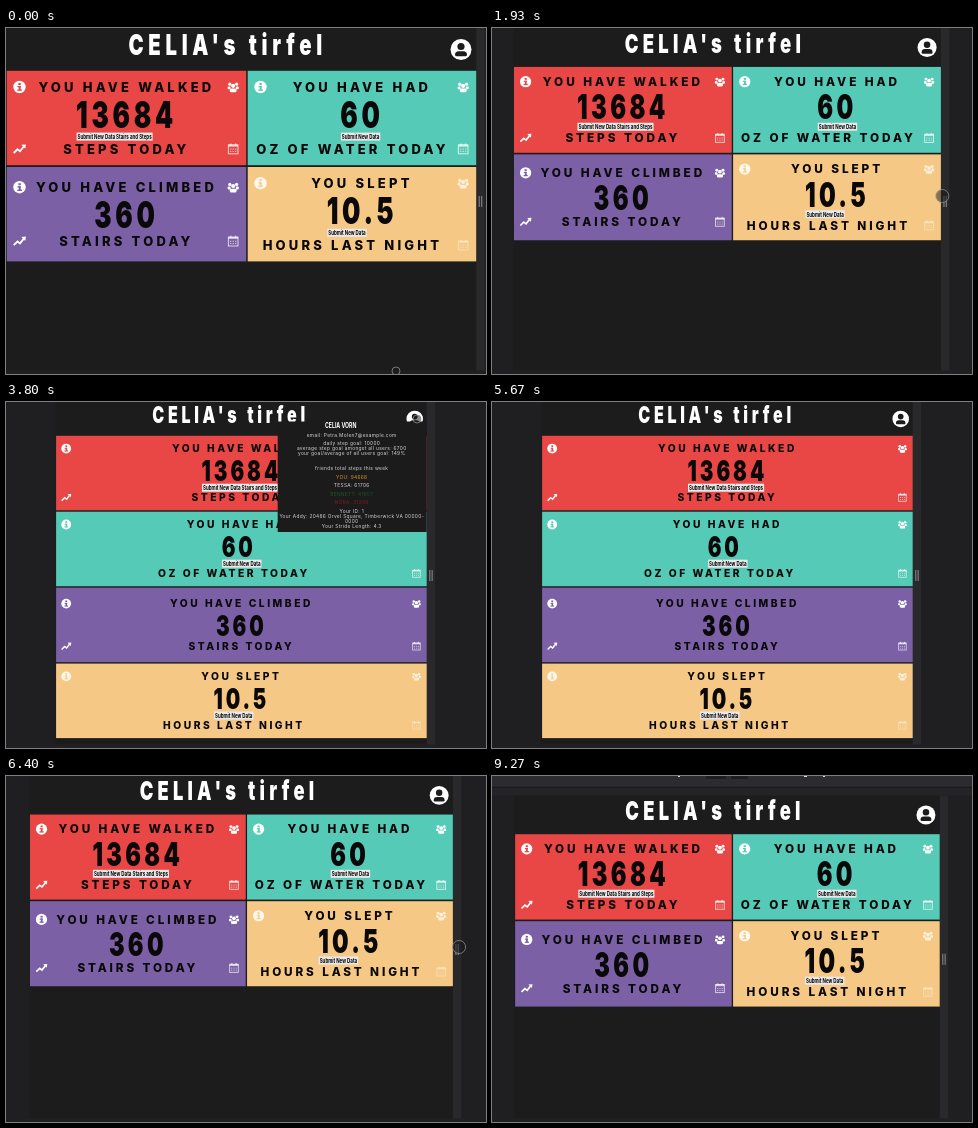
Recreate the animation shown at these times as an HTML page with a canvas. Size 480x346 px, loop 9590 ms.

```html
<!DOCTYPE html>
<html lang="en">
<head>
<meta charset="utf-8">
<title>Fitness dashboard</title>
<style>
  html, body { margin: 0; width: 480px; height: 346px; overflow: hidden; background: #1f1f22; }
  canvas { display: block; }
</style>
</head>
<body>
<canvas id="stage" width="480" height="346"></canvas>
<script>
const ctx = document.getElementById('stage').getContext('2d');
const LOOP = 9590;
const BASE = 470;          // page width at which the layout has scale 1
const BREAKPOINT = 400;    // below this the cards stack
const NARROW = 0.7;        // shared proportion of the condensed display face
const INK = '#0a0808';

const cards = [
  { color: '#e84745', head: 'YOU HAVE WALKED', value: '13684', foot: 'STEPS TODAY',
    button: 'Submit New Data Stairs and Steps', trend: true, slot: 0, row: 0 },
  { color: '#55cab6', head: 'YOU HAVE HAD', value: '60', foot: 'OZ OF WATER TODAY',
    button: 'Submit New Data', slot: 1, row: 0 },
  { color: '#7b60a6', head: 'YOU HAVE CLIMBED', value: '360', foot: 'STAIRS TODAY',
    trend: true, slot: 0, row: 1 },
  { color: '#f5c985', head: 'YOU SLEPT', value: '10.5', foot: 'HOURS LAST NIGHT',
    button: 'Submit New Data', faint: true, slot: 1, row: 1 }
];

const profile = [
  [33, 'email: Petra.Molen7@example.com'],
  [41, 'daily step goal: 10000'],
  [46, 'average step goal amongst all users: 6700'],
  [51, 'your goal/average of all users goal: 149%'],
  [66, 'friends total steps this week'],
  [75, 'YOU: 94668', '#e0922e'],
  [83.5, 'TESSA: 61706'],
  [92, 'BENNETT: 41657', '#23552b'],
  [100, 'NORA: 31208', '#7c2020'],
  [109, 'Your ID: 1'],
  [114, 'Your Addy: 20486 Orvel Square, Timberwick VA 00000-'],
  [119, '0000'],
  [124, 'Your Stride Length: 4.3']
];

const widthKeys = [[0, 470], [1600, 470], [2330, 371], [6070, 371], [6440, 425]];
const scrollKeys = [[0, 0], [9030, 0], [9270, 19.5]];
const cursorKeys = [
  [0, 390, 343], [70, 390, 343], [1000, 474, 172], [1130, 474, 172], [1270, 471, 168],
  [1600, 471, 168], [2330, 423, 168], [2870, 423, 168], [3500, 411, 17],
  [4930, 411, 17], [5600, 425, 174], [6070, 425, 171], [6440, 454, 171],
  [7070, 454, 171], [8000, 340, 118], [9000, 320, 3]
];

function track(keys, t, column = 1) {
  const next = keys.findIndex(key => key[0] > t);
  if (next < 0) return keys[keys.length - 1][column];
  const a = keys[next - 1], b = keys[next];
  const u = (t - a[0]) / (b[0] - a[0]);
  return a[column] + (b[column] - a[column]) * u * u * (3 - 2 * u);
}

function rect(x, y, w, h, color) {
  ctx.fillStyle = color;
  ctx.fillRect(x, y, w, h);
}

function disc(x, y, r) {
  ctx.beginPath();
  ctx.arc(x, y, r, 0, Math.PI * 2);
  ctx.fill();
}

function line(points, width) {
  ctx.lineWidth = width;
  ctx.beginPath();
  points.forEach(([x, y]) => ctx.lineTo(x, y));
  ctx.stroke();
}

// Type styles; a run's width includes the spacing after its last letter.
const styles = {
  title: { size: 29, weight: 900, spacing: 4.7, squeeze: NARROW },
  heading: { size: 13, weight: 800, spacing: 3.2 },
  value: { size: 37, weight: 900, spacing: 3.7, squeeze: NARROW },
  button: { size: 6.4, weight: 700, squeeze: NARROW },
  name: { size: 7.4, weight: 700, squeeze: NARROW },
  small: { size: 4.8, weight: 400, spacing: 0.33 }
};

function setStyle({ size, weight, spacing = 0, squeeze = 1 }) {
  ctx.font = `${weight} ${size}px Inter, sans-serif`;
  ctx.letterSpacing = `${spacing / squeeze}px`;
  return squeeze;
}

function textWidth(str, style) {
  const squeeze = setStyle(style);
  return ctx.measureText(str).width * squeeze;
}

function text(str, x, y, style, color = INK) {
  ctx.save();
  ctx.translate(x, y);
  ctx.scale(setStyle(style), 1);
  ctx.fillStyle = color;
  ctx.fillText(str, 0, 0);
  ctx.restore();
}

function centred(str, x, y, style, color) {
  text(str, x - textWidth(str, style) / 2, y, style, color);
}

// Icons are drawn around their own centre.
const icons = {
  info(color) {
    disc(0, 0, 6.2);
    rect(-1.1, -4, 2.4, 2, color);
    rect(-2, -1, 3.2, 1.3, color);
    rect(-0.8, -1, 2, 4, color);
    rect(-2.2, 2.4, 4.6, 1.4, color);
  },
  users() {
    disc(-3.4, -2.8, 1.6);
    disc(3.4, -2.8, 1.6);
    disc(0, -1.2, 2.1);
    ctx.beginPath();
    ctx.roundRect(-5.6, -0.6, 3, 2.8, 1);
    ctx.roundRect(2.6, -0.6, 3, 2.8, 1);
    ctx.roundRect(-3.4, 1.6, 6.8, 3.6, 1.5);
    ctx.fill();
  },
  trend() {
    line([[-5.8, 4], [-2, 0.3], [0.5, 2.2], [4.5, -2.8]], 1.8);
    ctx.beginPath();
    ctx.moveTo(1.8, -4.3);
    ctx.lineTo(6.4, -4.6);
    ctx.lineTo(5.8, -0.2);
    ctx.fill();
  },
  calendar() {
    ctx.lineWidth = 1;
    ctx.strokeRect(-4.8, -4.2, 9.6, 9);
    ctx.fillRect(-4.8, -4.2, 9.6, 1.8);
    ctx.fillRect(-3, -5.5, 1.2, 2);
    ctx.fillRect(1.8, -5.5, 1.2, 2);
    for (let i = 0; i < 6; i++) ctx.fillRect(-3.1 + i % 3 * 2.5, -0.4 + (i / 3 | 0) * 2.3, 1.2, 1);
  },
  user() {
    disc(0, 0, 10.5);
    ctx.fillStyle = '#1c1c1c';
    disc(0, -3, 3.6);
    ctx.beginPath();
    ctx.roundRect(-6, 1.7, 12, 5, [4, 4, 1.5, 1.5]);
    ctx.fill();
  }
};

function icon(name, x, y, alpha = 1, color) {
  ctx.save();
  ctx.translate(x, y);
  ctx.globalAlpha = alpha;
  ctx.fillStyle = ctx.strokeStyle = '#fff';
  icons[name](color);
  ctx.restore();
}

const buttonWidth = str => textWidth(str, styles.button) + 2;

function drawButton(str, x, y, scale) {
  ctx.save();
  ctx.translate(x, y);
  ctx.scale(1 / scale, 1 / scale);   // buttons keep their size at any page width
  rect(0, -4, buttonWidth(str), 8, '#e9e9e9');
  text(str, 1, 2.4, styles.button);
  ctx.restore();
}

function drawCard(card, index, stacked, scale) {
  const x = card.slot && !stacked ? 241.5 : 0.5;
  const w = stacked ? 469.5 : card.slot ? 228.5 : 239.5;
  const y = 42.8 + 96.2 * (stacked ? index : card.row);
  const mid = x + w / 2;
  const inset = card.button ? 0 : 4;
  const top = y + 16.2 + inset;
  const bottom = y + 78.2 - inset;
  const footX = card.trend ? mid : mid - 9.5;

  rect(x, y, w, 94.4, card.color);
  centred(card.head, mid, top + 4.8, styles.heading);
  centred(card.foot, footX, bottom + 4.8, styles.heading);

  // The value and its button share a left edge inside a centred block.
  const block = Math.max(textWidth(card.value, styles.value),
    card.button ? buttonWidth(card.button) / scale : 0);
  const start = mid - block / 2;
  text(card.value, start, y + 57.4 + inset, styles.value);
  if (card.button) drawButton(card.button, start + 0.5, y + 65.8, scale);

  icon('info', x + 12.8, top, card.faint ? 0.85 : 1, card.color);
  icon('users', x + w - 13, top, card.faint ? 0.7 : 1);
  if (card.trend) icon('trend', x + 12.8, bottom);
  icon('calendar', x + w - 13, bottom, card.faint ? 0.35 : 0.75);
}

function drawProfile(right) {
  rect(right - 149, 19.5, 149, 110.5, '#1b1b1b');
  centred('CELIA VORN', right - 86, 25.5, styles.name, '#fff');
  profile.forEach(([y, str, color = '#d8d8d8']) =>
    centred(str, right - 75, y + 1.6, styles.small, color));
}

function drawToolbar(scroll) {
  rect(0, 0, 480, scroll, '#242428');
  rect(0, 0, 480, scroll * 0.57, '#2c2c30');
  rect(0, scroll * 0.55, 480, 1, '#18181b');
  if (scroll < 15) return;
  rect(214, 0, 20, 3, '#1d1d20');
  rect(239, 0, 17, 3, '#1d1d20');
  [[186, 2], [312, 3], [331, 2]].forEach(([x, w]) => rect(x, 0, w, 1, '#ddd'));
}

function drawCursor(t) {
  if (t > 9070 || (t > 5560 && t < 6070)) return;
  const dragging = (t > 1270 && t < 2600) || (t >= 6070 && t < 7070);
  ctx.beginPath();
  ctx.arc(track(cursorKeys, t), track(cursorKeys, t, 2), dragging ? 6.5 : 4, 0, Math.PI * 2);
  ctx.fillStyle = 'rgba(25,25,27,.5)';
  ctx.fill();
  ctx.strokeStyle = 'rgba(150,150,153,.75)';
  ctx.lineWidth = 1;
  ctx.stroke();
}

function draw(t) {
  const width = track(widthKeys, t);
  const scroll = track(scrollKeys, t);
  const scale = width / BASE;
  const left = 235.2 - width / 2;
  const right = left + width;

  rect(0, 0, 480, 346, '#1f1f22');
  rect(left, scroll, width, 346, '#1c1c1c');
  rect(right, scroll, 8.5, 346, '#29292c');

  ctx.save();
  ctx.translate(left, scroll);
  ctx.scale(scale, scale);
  centred("CELIA's tirfel", 221.5, 27, styles.title, '#fff');
  icon('user', 454.8, 21.5);
  cards.forEach((card, i) => drawCard(card, i, width < BREAKPOINT, scale));
  ctx.restore();

  if (t >= 3600 && t < 4670) drawProfile(right);

  rect(0, 342.5, 480, 3.5, '#202023');
  const gripY = 168 + scroll / 2;
  rect(right + 2.4, gripY, 1.3, 11, '#77777a');
  rect(right + 4.8, gripY, 1.3, 11, '#77777a');
  if (scroll > 0) drawToolbar(scroll);
  drawCursor(t);
}

const start = performance.now();
function tick() {
  draw((performance.now() - start) % LOOP);
  requestAnimationFrame(tick);
}
tick();
</script>
</body>
</html>
```
